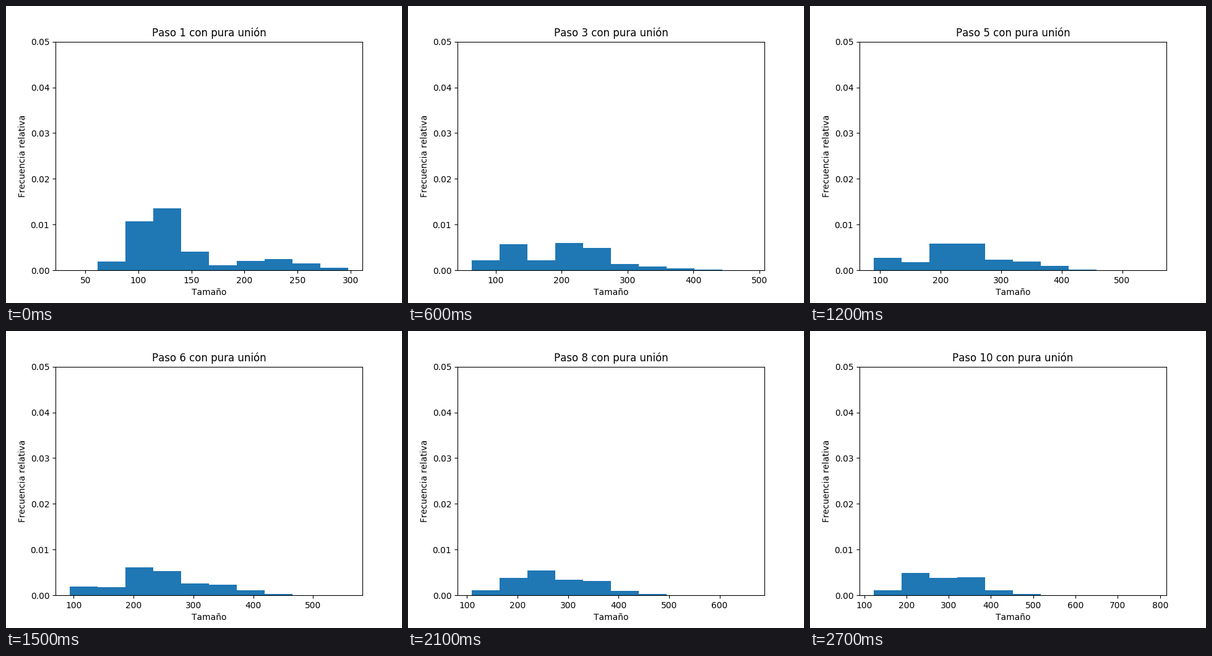
Recreate the animation shown at these times as a matplotlib script. Size 640 by 480 pixels, loop 3000 ms.

```python
import numpy as np
import matplotlib.pyplot as plt
from matplotlib.animation import FuncAnimation

STEPS = 10
BINS = 10
SAMPLES = 40  # density samples per bin

# Smallest and largest cluster size at a few key steps
KEY_STEPS = [1, 2, 3, 5, 7, 9, 10]
KEY_LOW = [35, 59, 63, 89, 97, 121, 122]
KEY_HIGH = [298, 402.4, 486.5, 550, 568, 754, 782]

plt.rcParams["font.family"] = "DejaVu Sans"
plt.rcParams["text.kerning_factor"] = 6  # whole-pixel glyph advances
fig, ax = plt.subplots(figsize=(6.4, 4.8), dpi=100)


def size_density(size, step):
    """Mixture of clusters made of k joined pieces; k grows with the step."""
    pieces = np.arange(1, 7)
    typical = 0.93 + 0.7 * np.log(step)
    weights = np.exp(-0.5 * ((pieces - typical) / 0.65) ** 2)
    weights /= weights.sum()
    mean = 10 + 108 * pieces
    spread = 20 * pieces ** 0.7
    z = (size[..., None] - mean) / spread
    bells = np.exp(-0.5 * z ** 2) / (spread * np.sqrt(2 * np.pi))
    return bells @ weights


def histogram(step):
    low = np.interp(step, KEY_STEPS, KEY_LOW)
    high = np.interp(step, KEY_STEPS, KEY_HIGH)
    edges = np.linspace(low, high, BINS + 1)
    width = edges[1] - edges[0]
    offsets = (np.arange(SAMPLES) + 0.5) / SAMPLES * width
    heights = size_density(edges[:-1, None] + offsets, step).mean(axis=1)
    return edges, heights / (heights.sum() * width)


def draw(index):
    step = index + 1
    edges, heights = histogram(step)
    margin = 0.05 * (edges[-1] - edges[0])
    ax.clear()
    ax.bar(edges[:-1], heights, width=np.diff(edges), align="edge",
           color="#1f77b4")
    ax.set_xlim(edges[0] - margin, edges[-1] + margin)
    ax.set_ylim(0, 0.05)
    ax.set_xlabel("Tamaño")
    ax.set_ylabel("Frecuencia relativa")
    ax.set_title(f"Paso {step} con pura unión")
    return ax.patches


animation = FuncAnimation(fig, draw, frames=STEPS, interval=300,
                          repeat=True, repeat_delay=0, blit=False)
plt.show()
```
